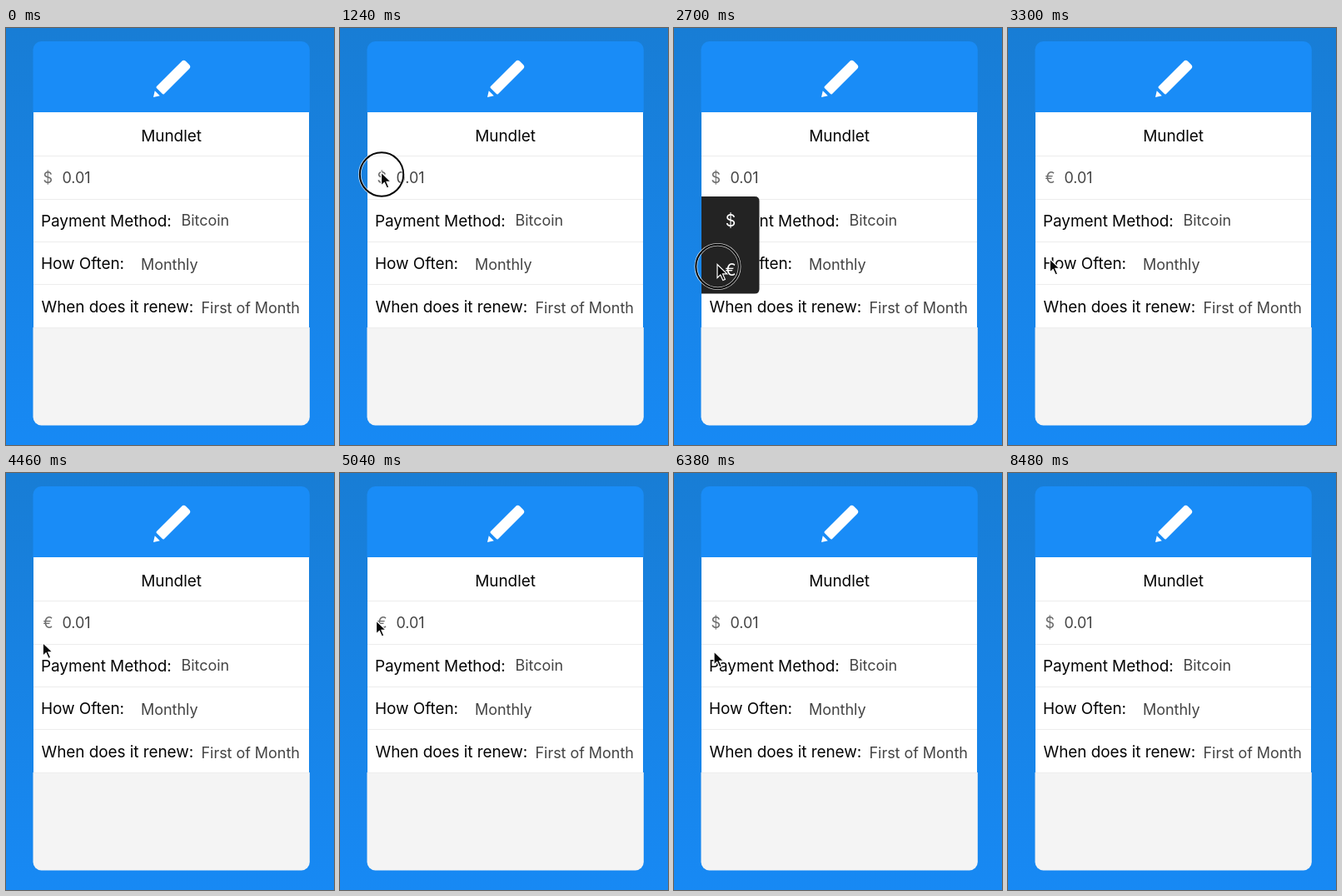
Recreate the animation shown at these times as an HTML page. Size 394 by 500 pixels, loop 9.06 s.

```html
<!DOCTYPE html>
<html lang="en">
<head>
<meta charset="utf-8">
<title>Currency picker</title>
<style>
  html, body { margin: 0; width: 100%; height: 100%; overflow: hidden; }
  svg { display: block; width: 394px; height: 500px; font-family: Inter, "Noto Sans", sans-serif; }
  .label { font-size: 19px; letter-spacing: -.08px; fill: #050505; }
  .value { font-size: 18px; letter-spacing: -.04px; fill: #444; }
  .sign { fill: #6c6c6c; }
  .option { font-size: 19.5px; fill: #fff; text-anchor: middle; }
  .mid { text-anchor: middle; }
</style>
</head>
<body>
<svg viewBox="0 0 394 500">
  <defs>
    <linearGradient id="sky" x2="0" y2="1">
      <stop offset="0" stop-color="#187dd5"/>
      <stop offset="1" stop-color="#1789f4"/>
    </linearGradient>
    <clipPath id="card"><rect x="32.5" y="16" width="332.3" height="460.5" rx="10"/></clipPath>
  </defs>
  <rect width="394" height="500" fill="url(#sky)"/>

  <g clip-path="url(#card)">
    <rect x="32" y="16" width="334" height="86" fill="#198cf7"/>
    <rect x="33" y="101" width="331" height="259" fill="#fff"/>
    <rect x="32" y="359" width="334" height="118" fill="#f4f4f4"/>
    <path d="M33 153.5h331M33 205.5h331M33 256.5h331M33 307.5h331M33 359.5h331" stroke="#ededed"/>
  </g>

  <g fill="#fff" transform="translate(177 83) rotate(-45)">
    <path d="M12 -6.4H54.5Q58 -6.4 58 -3V3Q58 6.4 54.5 6.4H12Q10.5 6.4 10.5 5V-5Q10.5 -6.4 12 -6.4Z"/>
    <path d="M0 0L6.8 -4.3V4.3Z"/>
  </g>

  <text class="label mid" x="198.5" y="136">Mundlet</text>
  <text class="value sign" id="sign" x="44.5" y="185.7">$</text>
  <text class="value" x="67.5" y="185.7">0.01</text>
  <text class="label" x="42" y="238">Payment Method:</text>
  <text class="value" x="210.5" y="237.3">Bitcoin</text>
  <text class="label" x="42" y="289">How Often:</text>
  <text class="value" x="162" y="290">Monthly</text>
  <text class="label" x="42.5" y="341">When does it renew:</text>
  <text class="value" x="234.5" y="342">First of Month</text>

  <g id="menu">
    <path d="M33 202H97Q102.5 202 102.5 207.5V313Q102.5 318.5 97 318.5H33Z" fill="#232323"/>
    <text class="option" x="68" y="238">$</text>
    <text class="option" x="68" y="296.5">€</text>
  </g>

  <g id="pointer">
    <g id="ring" fill="none">
      <circle cx=".5" cy="2.5" r="26.2" stroke="#fff" stroke-opacity=".75" stroke-width="3.6"/>
      <circle cx=".5" cy="2.5" r="26.2" stroke="#080808" stroke-width="2"/>
    </g>
    <path d="M0 0V16L3.8 12.4L6.8 19L9.4 17.9L6.5 11.4H11.7Z" fill="#080808" stroke="#fff" stroke-width="1.2"/>
  </g>
</svg>

<script>
  const LOOP = 9060;
  const OPEN_DELAY = 360, CLOSE_DELAY = 220, FADE = 160;

  const away = { x: -16, y: 240 };
  const moves = [
    { from: 20, to: 900, x: 49.5, y: 173 },
    { from: 2100, to: 2640, x: 52, y: 283.5 },
    { from: 3100, to: 3680, x: 46, y: 260 },
    { from: 3900, to: 4800, x: 43.5, y: 177 },
    { from: 5040, to: 5540, x: 48, y: 214 },
    { from: 7180, to: 7460, ...away }
  ];

  // clicks alternately open the menu and pick a currency from it
  const clicks = [1180, 2640, 4740, 5760];
  const [open1, pick1, open2, pick2] = clicks;

  const el = id => document.getElementById(id);
  const [sign, menu, pointer, ring] = ["sign", "menu", "pointer", "ring"].map(el);

  function ease(t, from, to) {
    const u = Math.min(1, Math.max(0, (t - from) / (to - from)));
    return u * u * (3 - 2 * u);
  }
  const fade = (t, from, length = FADE) => ease(t, from, from + length);
  const pulse = (t, click) => fade(t, click, 40) - fade(t, click + 160, 100);
  const shownBetween = (t, open, pick) => fade(t, open + OPEN_DELAY) - fade(t, pick + CLOSE_DELAY);

  function place(t) {
    return moves.reduce((p, m) => {
      const k = ease(t, m.from, m.to);
      return { x: p.x + (m.x - p.x) * k, y: p.y + (m.y - p.y) * k };
    }, away);
  }

  function draw(t) {
    const { x, y } = place(t);
    const shown = shownBetween(t, open1, pick1) + shownBetween(t, open2, pick2);
    const isEuro = t >= pick1 + CLOSE_DELAY && t < pick2 + CLOSE_DELAY;
    pointer.setAttribute("transform", `translate(${x} ${y})`);
    ring.setAttribute("opacity", Math.max(...clicks.map(c => pulse(t, c))));
    menu.setAttribute("opacity", shown);
    menu.setAttribute("transform", `translate(67.75 260.5) scale(${.9 + .1 * shown}) translate(-67.75 -260.5)`);
    sign.textContent = isEuro ? "€" : "$";
  }

  const start = performance.now();
  function tick() {
    draw((performance.now() - start) % LOOP);
    requestAnimationFrame(tick);
  }
  draw(0);
  requestAnimationFrame(tick);
</script>
</body>
</html>
```
